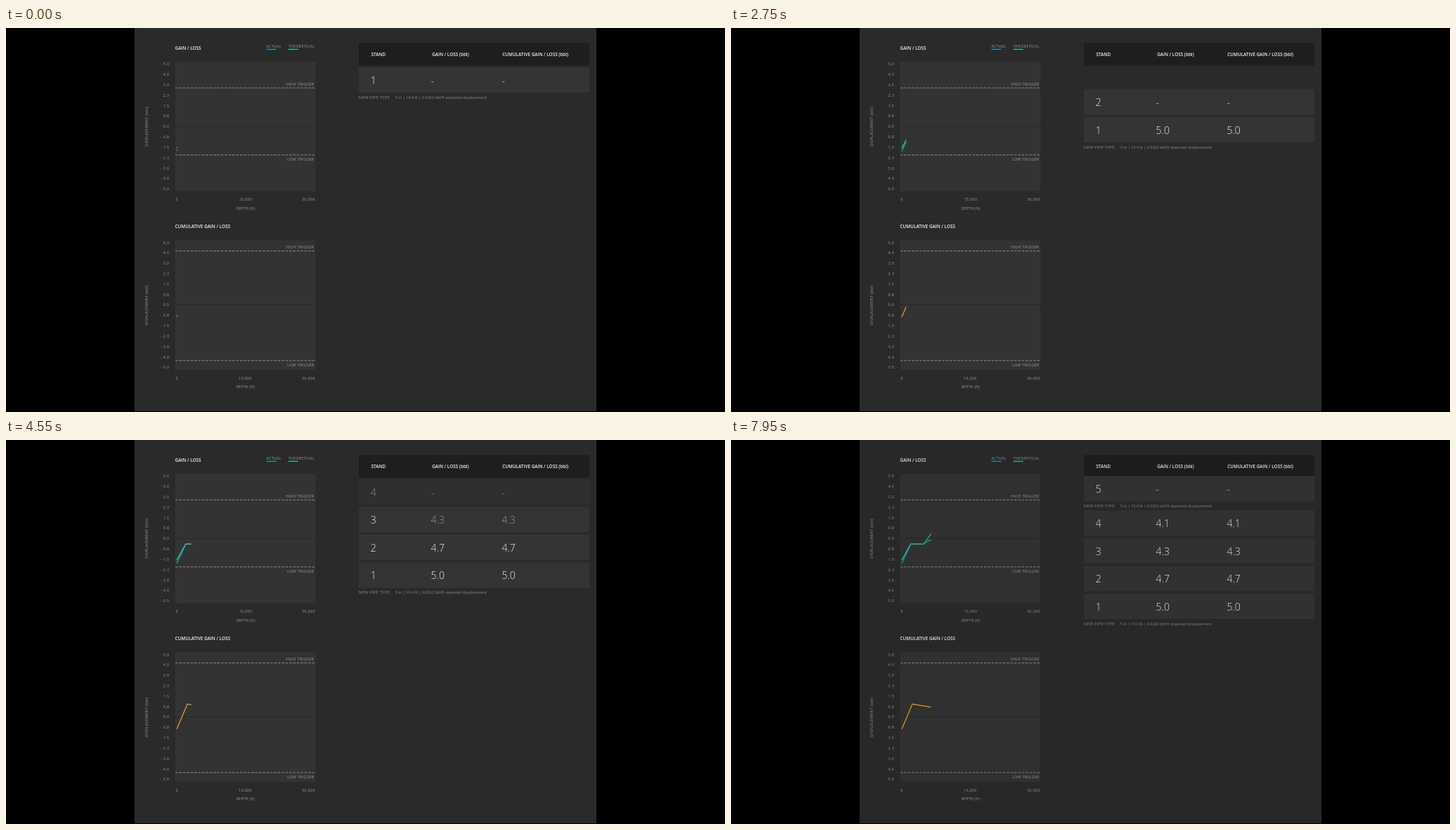
An HTML page for the animation above (8000 ms loop, 1023 px wide and 547 px high).

```html
<!DOCTYPE html>
<html lang="en">
<head>
<meta charset="utf-8">
<title>Gain / Loss</title>
<style>
html, body { margin: 0; height: 100%; overflow: hidden; background: #000; }
svg { display: block; width: 100vw; height: 100vh; font-family: "Open Sans", "Noto Sans", sans-serif; }
text { white-space: pre; }
.head { font-size: 6.4px; font-weight: 600; fill: #f4f4f4; }
.label { font-size: 5px; letter-spacing: .5px; fill: #a4a4a4; }
.unit { font-size: 5px; letter-spacing: .3px; fill: #a4a4a4; }
.num { font-size: 14.1px; font-weight: 300; fill: #ececec; }
.note { font-size: 5.8px; letter-spacing: .25px; fill: #8c8c8c; }
.spec { font-size: 5.45px; fill: #8c8c8c; }
.line { fill: none; stroke-width: 1.2; stroke-linejoin: round; }
</style>
</head>
<body>
<svg id="stage" viewBox="0 0 1023 547" preserveAspectRatio="none"></svg>
<script>
const stage = document.getElementById("stage");
const LOOP = 8000, FRAME = 50;
const ROW_TOP = 55.7, ROW_H = 36.4;

// Each step pushes the rows down, then reveals a new row and more of the lines.
const steps = [
  { start: 900, end: 1700, shift: 39.5 },
  { start: 2400, end: 3200, shift: 39.5 },
  { start: 3900, end: 4700, shift: 39.5 },
  { start: 5490, end: 6150, shift: 44.5 }
];
const reach = [243.7, 249.2, 254.7, 272.7, 284.7];
const gains = ["5.0", "4.7", "4.3", "4.1"];

function add(parent, tag, attrs, content) {
  const el = document.createElementNS("http://www.w3.org/2000/svg", tag);
  for (const key in attrs) el.setAttribute(key, attrs[key]);
  if (content !== undefined) el.textContent = content;
  return parent.appendChild(el);
}
const rect = (parent, x, y, width, height, fill) =>
  add(parent, "rect", { x, y, width, height, fill });
const text = (parent, cls, x, y, content, anchor = "start") =>
  add(parent, "text", { class: cls, x, y, "text-anchor": anchor }, content);
const rule = (y, stroke, dash = "none") =>
  add(stage, "path", { d: `M241 ${y}H440`, stroke, "stroke-dasharray": dash });

function chart(top, title, high, low, middle) {
  text(stage, "head", 240.5, top - 17, title);
  rect(stage, 240.7, top, 199.6, 184.6, "#333");
  rule(top + 92, "#292929");
  for (const y of [high, low]) rule(y, "#8a8a8a", "3.6 1.8");
  text(stage, "label", 438.4, high - 3.7, "HIGH TRIGGER", "end");
  text(stage, "label", 438.4, low + 8, "LOW TRIGGER", "end");

  const scale = ["5.0", "4.0", "3.0", "2.3", "1.5", "0.8"];
  const ticks = [...scale, "0.0", ...scale.reverse().map(v => "- " + v)];
  ticks.forEach((v, i) => text(stage, "label", 232.3, top + 5.2 + i * 14.83, v, "end"));

  text(stage, "label", 243.2, top + 198.4, "0", "middle");
  text(stage, "label", middle, top + 198.4, "15,000", "middle");
  text(stage, "label", 439.8, top + 198.4, "30,000", "end");
  text(stage, "unit", middle + .4, top + 210.9, "DEPTH (ft)", "middle");
  const side = text(stage, "label", 0, 0, "DISPLACEMENT (bbl)", "middle");
  side.setAttribute("transform", `translate(201.8 ${top + 92.3}) rotate(-90)`);
}

function legend(x, name, color) {
  text(stage, "label", x, 28, name);
  rect(stage, x, 29.8, 14, 1.2, color);
}

function pipeNote(parent, y) {
  const g = add(parent, "g", {});
  text(g, "note", 501.8, y + 2, "NEW PIPE TYPE");
  text(g, "spec", 554, y + 1.9, "5 in | 19.4 lb | 0.0262 bbl/ft expected displacement");
  return g;
}

function makeRow(i) {
  const g = add(stage, "g", {});
  rect(g, 502, 0, 328, ROW_H, "#343434");
  text(g, "num", 518.8, 24.2, i + 1);
  const pair = value => {
    const p = add(g, "g", {});
    for (const x of [604.6, 705.4]) text(p, "num", x, 24.2, value);
    return p;
  };
  const blank = pair("-");
  const value = i < gains.length ? pair(gains[i]) : null;
  if (i === 0 || i === 4) pipeNote(g, 43.2);
  return { g, blank, value };
}

rect(stage, 183, 0, 657, 546, "#2a2a2a");
chart(48, "GAIN / LOSS", 85.3, 180.8, 341);
chart(302.3, "CUMULATIVE GAIN / LOSS", 317.6, 473.8, 340.3);
legend(370.5, "ACTUAL", "#2196d3");
legend(401.7, "THEORETICAL", "#20d873");

const clip = add(add(stage, "clipPath", { id: "drawn" }), "rect", { x: 241, y: 40, height: 460 });
const plot = add(stage, "g", { "clip-path": "url(#drawn)" });
const line = (stroke, points) => add(plot, "polyline", { class: "line", stroke, points });
line("#1cd884", "243,171 255.5,148.2 274,148.5 285,133");
line("#1fa8c8", "243,175.5 256,148 274,148 285,141.6");
line("#eda71c", "243,411.8 258,376.2 285,380.6");

rect(stage, 502, 21.5, 328, 32, "#1e1e1e");
text(stage, "head", 519.6, 39.8, "STAND");
text(stage, "head", 606.2, 39.8, "GAIN / LOSS (bbl)");
text(stage, "head", 706.2, 39.8, "CUMULATIVE GAIN / LOSS (bbl)");

const rows = [0, 1, 2, 3, 4].map(makeRow);
const shade = rect(stage, 0, 0, 1023, 547, "#000");

const clamp = v => Math.max(0, Math.min(1, v));
const ease = v => (1 - Math.cos(Math.PI * clamp(v))) / 2;

function draw(now) {
  const t = Math.floor(now % LOOP / FRAME) * FRAME;
  const moved = steps.map(s => s.shift * ease((t - s.start) / 500));
  const shown = steps.map(s => clamp((t - s.end + 300) / 300));

  rows.forEach((row, i) => {
    const base = i === 4 ? ROW_TOP - 4.7 : ROW_TOP;
    const y = moved.slice(i).reduce((sum, d) => sum + d, base);
    row.g.setAttribute("transform", `translate(0 ${y})`);
    row.g.setAttribute("opacity", i ? shown[i - 1] : 1);
    if (row.value) {
      row.value.setAttribute("opacity", shown[i]);
      row.blank.setAttribute("opacity", 1 - shown[i]);
    }
  });

  const end = shown.reduce((x, f, i) => x + f * (reach[i + 1] - reach[i]), reach[0]);
  clip.setAttribute("width", end - 241);
  shade.setAttribute("opacity", t >= 7950 ? .06 : 0);
  requestAnimationFrame(draw);
}
requestAnimationFrame(draw);
</script>
</body>
</html>
```
